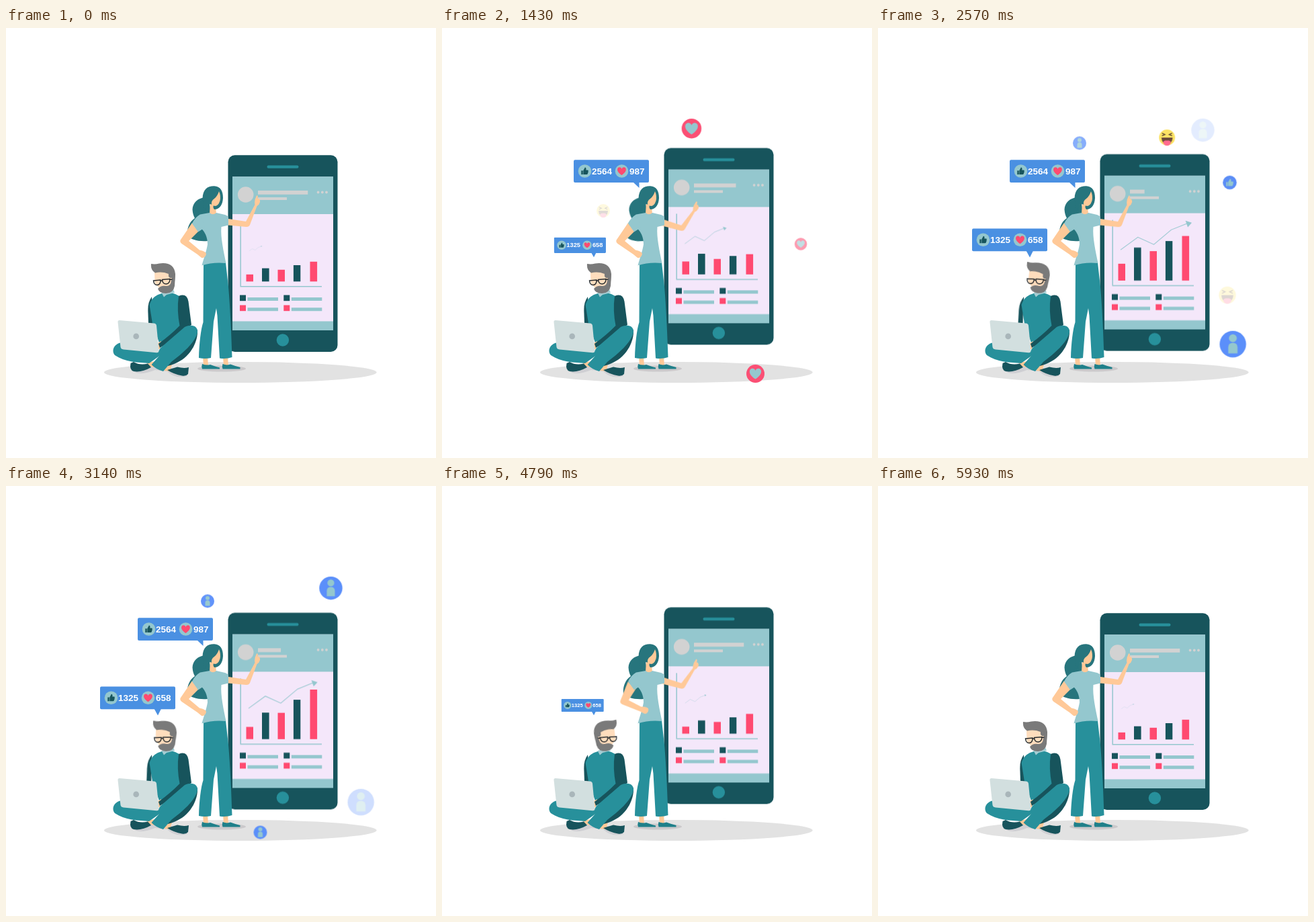
An HTML page without scripts for the animation above (6000 ms loop, 640 by 640 pixels).

```html
<!DOCTYPE html>
<html lang="en">
<head>
<meta charset="utf-8">
<title>Social statistics</title>
<style>
html, body { margin: 0; width: 100%; height: 100%; overflow: hidden; background: #fff; }
svg { display: block; width: 100vw; height: 100vh; }
text { font: bold 13.5px "Liberation Sans", Arial, sans-serif; fill: #fff; }

.dark { fill: #17545c; }
.teal { fill: #27909b; }
.pale { fill: #94c7ce; }
.pink { fill: #ff4a70; }
.skin { fill: #ffc998; }
.grey { fill: #d2d2d2; }
.hair { fill: #27757d; }
.blue { fill: #4a90e2; }

.phone, .bar, .trend, .point, .hip, .tail, .nod, .elbow, .line, .hers, .his, .icon {
  animation: 6s cubic-bezier(.37, 0, .63, 1) infinite both;
}
.phone { animation-name: bob; }
.bar { animation-name: grow; transform-origin: 0 377.3px; }
.trend { animation-name: trend; transform-origin: 362px 332px; }
.line { animation-name: line; animation-timing-function: linear; transform-origin: 375px 0; }
.point { animation-name: point; transform-origin: 322px 286px; }
.hip { animation-name: hip; transform-origin: 283px 292px; }
.tail { animation-name: tail; transform-origin: 296px 260px; }
.nod { animation-name: nod; transform-origin: 240px 392px; }
.elbow { animation-name: elbow; transform-origin: 216px 402px; }
.hers { animation-name: hers; animation-timing-function: linear; transform-origin: 293px 238px; }
.his { animation-name: his; animation-timing-function: linear; transform-origin: 226px 341px; }
.icon { animation-name: show; animation-timing-function: linear; }

@keyframes bob {
  0%, 48.67%, 97.33%, 100% { transform: translateY(0); }
  24.33%, 73% { transform: translateY(-10.6px); }
}
@keyframes grow {
  0%, 8.33%, 66.67%, 100% { transform: scaleY(1); }
  37.5% { transform: scaleY(2.51); }
}
@keyframes trend {
  0%, 2.5%, 91%, 100% { transform: scale(.18); }
  45.8% { transform: scale(1); }
}
@keyframes line {
  0%, 18.33%, 69.67%, 100% { transform: scaleX(1); }
  45% { transform: scaleX(.23); }
}
@keyframes point {
  0%, 45%, 53%, 98.5%, 100% { transform: rotate(0deg); }
  25%, 76.7% { transform: rotate(9.5deg); }
}
@keyframes hip {
  0%, 66%, 96.5%, 100% { transform: rotate(0deg); }
  77%, 86% { transform: rotate(-12.6deg); }
}
@keyframes tail {
  0%, 43%, 53%, 79%, 100% { transform: rotate(0deg); }
  23.8% { transform: rotate(-5deg); }
  65.5% { transform: rotate(-7deg); }
}
@keyframes nod {
  0%, 28% { transform: rotate(0deg); }
  44% { transform: rotate(8.5deg); }
  58.32% { transform: rotate(2deg); animation-timing-function: step-end; }
  58.33% { transform: translateX(2px) rotate(-9deg) scaleX(-1); animation-timing-function: step-end; }
  83.3%, 100% { transform: rotate(0deg); }
}
@keyframes elbow {
  0%, 28%, 68%, 100% { transform: rotate(0deg); }
  45% { transform: rotate(5.5deg); }
}
@keyframes hers {
  0%, 2%, 64.2%, 100% { transform: scale(0); }
  13.1%, 53.7% { transform: scale(1); }
}
@keyframes his {
  0%, 16.17%, 85.6%, 100% { transform: scale(0); }
  27.3%, 75.4% { transform: scale(1); }
}
@keyframes show {
  0%, 18%, 100% { opacity: 0; }
  5%, 13% { opacity: 1; }
}
</style>
</head>
<body>
<svg viewBox="0 0 640 640">
  <defs>
    <path id="heart" d="M0 6C-9 .5-7-5.7-3.2-5.7Q-.8-5.7 0-3.3Q.8-5.7 3.2-5.7C7-5.7 9 .5 0 6Z"/>
    <path id="thumb" d="M-5.2-.8h2.4v5.8h-2.4zM-2.2-.8L.3-5.5Q2.6-5.4 1.8-1.6H4.8Q5.8-.3 5 .8Q5.5 2.2 4.6 2.8Q4.5 5 3 5H-2.2z"/>
    <g id="love"><circle r="10" fill="#fb4f74"/><use href="#heart" class="pale"/></g>
    <g id="like"><circle r="10" fill="#5b8df6"/><use href="#thumb" class="pale"/></g>
    <g id="user">
      <circle r="10" fill="#5b8ffa"/>
      <g class="pale"><circle cy="-4.5" r="3"/><path d="M-3.5 7V2.3Q-3.5-1 0-1Q3.5-1 3.5 2.3V7Z"/></g>
    </g>
    <g id="laugh">
      <circle r="10" fill="#fbe364"/>
      <path d="M-6.3-5.5l3.6 1.7-3.6 1.7M6.3-5.5L2.7-3.8l3.6 1.7" fill="none" stroke="#5c4632" stroke-width="1.1"/>
      <path d="M-7 0H7Q6.5 8 0 8Q-6.5 8-7 0Z" fill="#6b4a3a"/>
      <path d="M-4.8 6Q-4 3.2 0 3.8Q4 3.2 4.8 6Q4 10.2 0 10.2Q-4 10.2-4.8 6Z" fill="#ff6b8e"/>
    </g>
    <g id="badge">
      <rect x="196" y="196.3" width="112" height="33.7" rx="2" class="blue"/>
      <g class="pale"><circle cx="212.5" cy="213" r="9.8"/><circle cx="267.5" cy="213" r="9.8"/></g>
      <use href="#thumb" x="212.5" y="213" class="dark"/>
      <use href="#heart" x="267.5" y="213" class="pink"/>
    </g>
    <g id="key">
      <rect x="348" y="397.5" width="9" height="8.7" class="dark"/>
      <rect x="348" y="412.5" width="9" height="8.7" class="pink"/>
      <path d="M359.5 401h45.5v5h-45.5zm0 15.2h45.5v5h-45.5z" class="pale"/>
    </g>
  </defs>

  <rect width="640" height="640" fill="#fff"/>
  <ellipse cx="348.8" cy="512.5" rx="202.8" ry="15.5" fill="#e2e2e2"/>

  <g class="phone">
    <rect x="330.5" y="189.2" width="163" height="292.8" rx="10" class="dark"/>
    <rect x="388.5" y="204.5" width="47" height="4.3" rx="2.1" class="teal"/>
    <rect x="337" y="221.3" width="150" height="228.7" fill="#f4e7fa"/>
    <path d="M337 221.3h150V277H337zM337 436.5h150V450H337z" class="pale"/>
    <circle cx="411.9" cy="464.5" r="9.2" class="teal"/>
    <g class="grey">
      <circle cx="356.7" cy="248" r="11.8"/>
      <rect x="375" y="242" width="74.3" height="5.8" class="line"/>
      <rect x="375" y="252" width="43" height="4"/>
      <circle cx="464.6" cy="244.5" r="1.9"/><circle cx="470.8" cy="244.5" r="1.9"/><circle cx="477" cy="244.5" r="1.9"/>
    </g>
    <path d="M349.2 287V384.8H470" fill="none" stroke="#94c7ce" stroke-width="1.5"/>
    <g class="trend">
      <path d="M361 331.5L387 312.5L411 323.5L437 301.5L462 291.5" fill="none" stroke="#94c7ce" stroke-width="1.1"/>
      <path d="M458.5 287.8L468 290.8L462 297.5Z" class="pale"/>
    </g>
    <rect class="bar pink" x="357.5" y="366.8" width="10.5" height="10.5"/>
    <rect class="bar dark" x="381" y="357.6" width="10.6" height="19.7" style="animation-delay:.2s"/>
    <rect class="bar pink" x="404.5" y="359.8" width="10.5" height="17.5" style="animation-delay:.4s"/>
    <rect class="bar dark" x="427.9" y="353" width="10.4" height="24.3" style="animation-delay:.6s"/>
    <rect class="bar pink" x="452.5" y="347.8" width="10.6" height="29.5" style="animation-delay:.8s"/>
    <use href="#key"/><use href="#key" x="65.3"/>
  </g>

  <!-- Woman -->
  <ellipse cx="321" cy="507" rx="36" ry="4.6" fill="#cbc9cb"/>
  <path class="tail hair" d="M301 253C288 250 278 259 277.500 270Q278 278 281 283C272 289 269 300 270 309C275 315 286 318 300 317L304 290Q306 270 301 253Z"/>
  <path class="skin" d="M293 489h7l1 14h-7zM323 489h7l1 14h-7zM304 260L303 276Q308 281 313 277L312 264Z"/>
  <path fill="#1f808a" d="M292 500Q298 502.500 304 501Q312 504 318 505.500V507.500H292Q290.500 504 292 500ZM322.500 500Q328 502.500 334 500.500Q342 503.500 348.500 505V507.500H322.500Q321 504 322.500 500Z"/>
  <path class="teal" d="M294 351Q310 346 327 349L331 385C334 420 335.500 460 336.500 490Q328 493 318 491.500L314.500 428L313 417L309 437L305 491Q296 493 287 491C287.500 470 290 448 293.500 438Z"/>
  <path class="point skin" d="M322 282L331 284L357 288L370.500 263Q369 257 373 249.500Q375.500 248 374.500 253.500Q378.500 254.500 378 259Q377 263 373.500 265L363 293Q361.500 296.500 357 296L331 293.500L322 293Z"/>
  <path class="pale" d="M289 277.500L303 275Q308 279.500 313 275L326 278Q331 279.500 331 283V293.500L320.500 296C319 311 324 333 327.500 350Q308 348 291.500 353.500C294 344 298.500 332 300 322C300 311 296 303 290 298L283 291Z"/>
  <path class="hip skin" d="M277 290L287 302L272 317L288 330.500Q297 332 298 336Q296.500 343 291 342L285 337L261.500 321Q258 318 260 315Z"/>
  <path class="pale" d="M289 277.500Q281 282 277 291L286 303.500L296 297Z"/>
  <path class="hair" d="M292.500 254C293 240 300 235 310 235.300C319 236 323 242 323 253C322.500 263 318 270 310 270Q307.500 267 309 264L304 262Q298 265 295 275Z"/>
  <path class="skin" d="M317 243Q320 250 318.500 257Q316 265 311 265L306 263.500Q305 257 310 254Q315 250 317 243Z"/>

  <!-- Man -->
  <path fill="#cfcfd3" d="M190 511Q200 518 222 509L240 511Q252 523 270 518L266 508L215 503Z"/>
  <path class="elbow dark" d="M217 400Q211 408 211.300 420L212 440H219Z"/>
  <path class="teal" d="M226 397Q240 391 252 396Q266 402 266 410L264 446L230 474L218 440L213.500 412Q216 402 226 397Z"/>
  <path class="skin" d="M209 498L222 496L220 505L213 503ZM232 503L247 501L244 511L236 510ZM224 470L231 466L229 478H226Z"/>
  <path class="dark" d="M185.500 499Q183.500 509 190 511Q202 513 216 505L211 499.500Q199 502.500 190 497ZM240 509L255 504.500Q265 507 272 505L271 515Q268 518.500 262 517.500Q250 515.500 240 509Z"/>
  <path class="dark" d="M285 449C286 467 275 486 260 495Q250 501 241 503L234 490L262 460Z"/>
  <path class="teal" d="M172 468C160 470 156.500 481 162 487C176 497 198 498 213 499L230 487L226 476Z"/>
  <path class="dark" d="M257 399Q269 394 271.500 407L276 442L265 448Q247 466 229 476L227 470Q246 456 258.500 443Q254 420 257 399Z"/>
  <path class="teal" d="M266 445C277 440 286 444 285 453C281 469 263 484 246 497L234 511Q223 508 216.500 501L229 487Q226 481 230 476Z"/>
  <path d="M169 435L220 439.600Q223.500 440 224 443L227.500 480Q227.500 483.500 224 483.200L175 478.500Q171 478 170.500 475L166.500 438Q166 435 169 435Z" fill="#d2dfdf"/>
  <circle cx="193.700" cy="458.900" r="4.300" fill="#a9b6ba"/>
  <path d="M231.500 394L249 389L251 394L239 397L235 400.500Z" fill="#a5cdd3"/>
  <g class="nod">
    <path d="M221 363H248V386Q238 391 229 388L221.500 380Z" fill="#ffddbd"/>
    <g fill="#7a7a7a">
      <path d="M216 351Q222 352 228 350.500Q250 347.500 252 366L251 378H246.500L247 372Q241 373 242 366Q232 362 222 364.500Q215 360 216 351Z"/>
      <path d="M226 388Q231 382.500 238 384Q245 385 246 376L248 368L252 366L251 384Q249 395 238 395Q228 395 226 388Z"/>
    </g>
    <path d="M219.500 376L230 375Q230 382.500 225 382.500Q220 382.500 219.500 376ZM232.500 374.500L244 373.500Q244 380.500 238.500 381Q233 381 232.500 374.500ZM230 376.500L232.500 376M244 374.500L247.500 374" fill="none" stroke="#252a2d" stroke-width="1.4"/>
  </g>

  <g class="hers">
    <use href="#badge"/>
    <path d="M284.500 229.500H293.500V238Z" class="blue"/>
    <text x="223" y="218">2564</text><text x="279" y="218">987</text>
  </g>
  <g class="his">
    <use href="#badge" x="-56" y="102.200"/>
    <path d="M220.500 331.500H231L226 341.500Z" class="blue"/>
    <text x="167" y="320">1325</text><text x="223" y="320">658</text>
  </g>

  <!-- Reactions -->
  <use href="#love" class="icon" style="animation-delay:.85s" transform="translate(371.400 149.600) scale(1.47)"/>
  <use href="#love" class="icon" style="animation-delay:1.05s" transform="translate(466.500 514.500) scale(1.35)"/>
  <use href="#love" class="icon" style="animation-delay:1.26s" transform="translate(534 321.500) scale(.92)"/>
  <use href="#laugh" class="icon" style="animation-delay:1.37s" transform="translate(240 272)"/>
  <use href="#laugh" class="icon" style="animation-delay:1.56s" transform="translate(520 397.500) scale(1.27)"/>
  <use href="#like" class="icon" style="animation-delay:1.95s" transform="translate(523.500 230) scale(1.03)"/>
  <use href="#laugh" class="icon" style="animation-delay:2s" transform="translate(430.200 163) scale(1.19)"/>
  <use href="#user" class="icon" style="animation-delay:2.15s" transform="translate(528.200 470.500) scale(1.97)"/>
  <use href="#user" class="icon" style="animation-delay:2.35s" transform="translate(300 171.300)"/>
  <use href="#user" class="icon" style="animation-delay:2.52s" transform="translate(483.500 152) scale(1.72)"/>
  <use href="#user" class="icon" style="animation-delay:2.84s" transform="translate(378.500 515.500)"/>
</svg>
</body>
</html>
```
